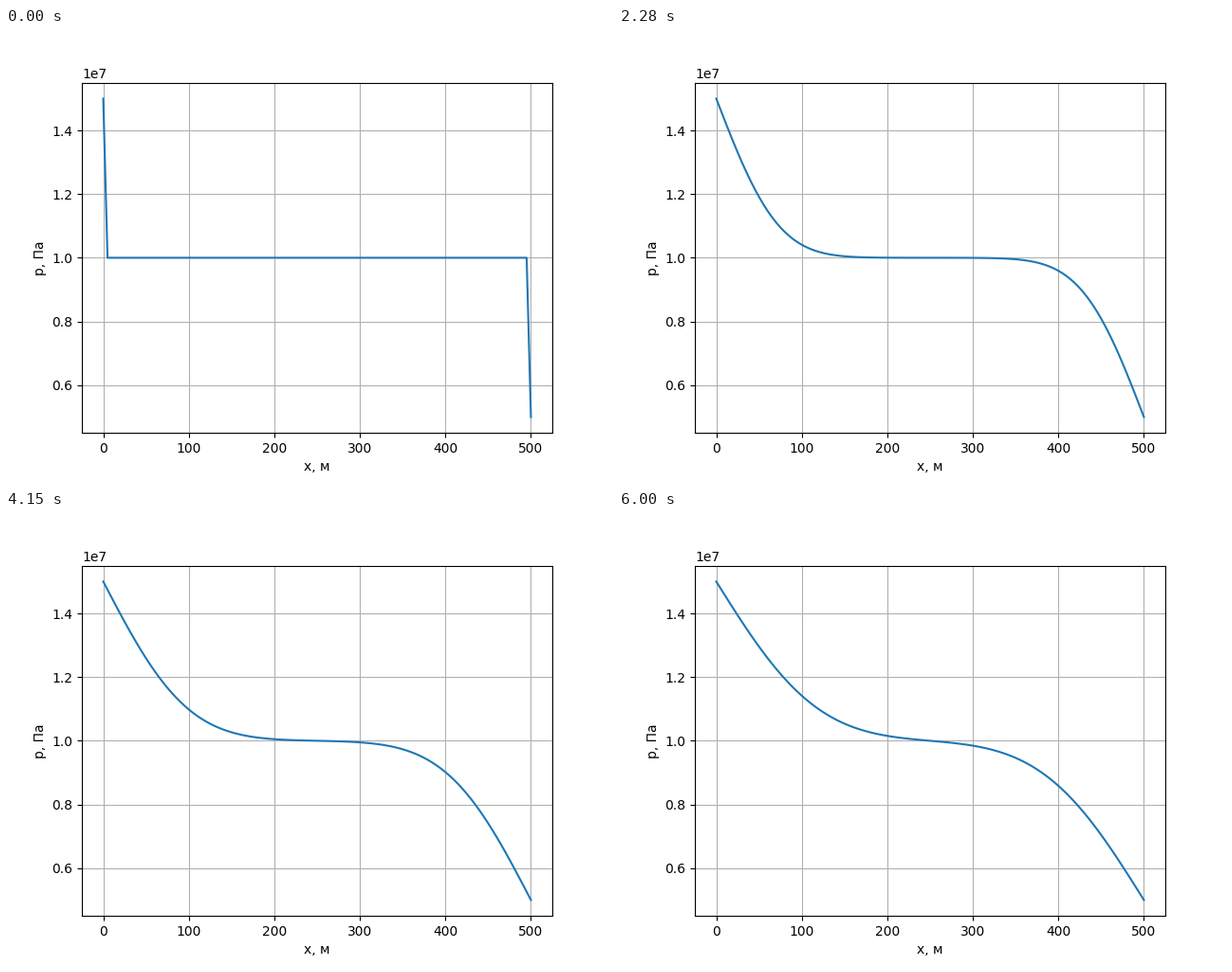
These frames come from a looping animation (640x480 px, 6.02 s). A matplotlib script:

```python
import numpy as np
import matplotlib.pyplot as plt
from matplotlib.animation import FuncAnimation

LOOP_MS = 6020
TICK_MS = 20
STEP_MS = 25

LENGTH = 500.0     # m
NODES = 101
DIFFUSION = 18.1   # m^2 per time step
P_LEFT, P_START, P_RIGHT = 1.5e7, 1.0e7, 0.5e7


def implicit_matrix(n, r):
    """Backward Euler for p_t = k p_xx with fixed end pressures."""
    a = np.eye(n)
    for i in range(1, n - 1):
        a[i, i - 1:i + 2] = -r, 1 + 2 * r, -r
    return a


def solve(steps):
    dx = LENGTH / (NODES - 1)
    advance = np.linalg.inv(implicit_matrix(NODES, DIFFUSION / dx**2))
    p = np.full(NODES, P_START)
    p[0], p[-1] = P_LEFT, P_RIGHT
    history = [p]
    for _ in range(steps):
        p = advance @ p
        history.append(p)
    return history


x = np.linspace(0, LENGTH, NODES)
pressure = solve(LOOP_MS // STEP_MS)

plt.rcParams["font.family"] = "DejaVu Sans"
fig, ax = plt.subplots(figsize=(6.4, 4.8), dpi=100)
line, = ax.plot(x, pressure[0])
ax.set_xlabel("x, м")
ax.set_ylabel("p, Па")
ax.grid(True)
ax.set_xlim(-25, 525)
ax.set_ylim(0.45e7, 1.55e7)


def update(tick):
    t = (tick + 0.5) * TICK_MS
    line.set_ydata(pressure[int(t // STEP_MS)])
    return line,


anim = FuncAnimation(fig, update, frames=LOOP_MS // TICK_MS,
                     interval=TICK_MS, repeat=True, repeat_delay=0)
plt.show()
```
